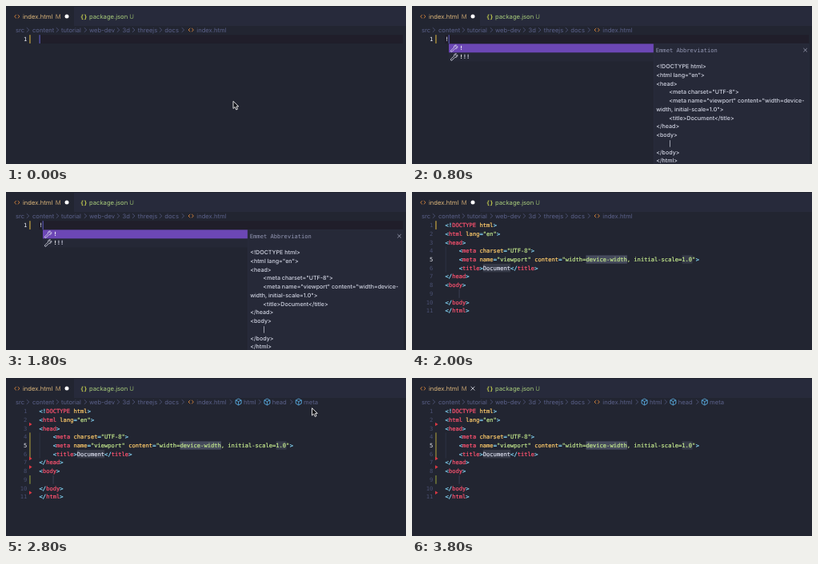
Write an HTML page that moves like this. It is 500x198 px and loops after 4000 ms.

```html
<!DOCTYPE html>
<html lang="en">
<head>
<meta charset="UTF-8">
<title>Emmet expansion</title>
<style>
  html, body { margin: 0; width: 100%; height: 100%; overflow: hidden; background: #222531; }
  svg { display: block; width: 500px; height: 198px; }
  text { white-space: pre; text-rendering: geometricPrecision; }
  .ui { font: 7.65px Inter, sans-serif; }
  .doc { font: 500 7.1px Inter, sans-serif; }
  .code { font: 7.125px "DejaVu Sans Mono", monospace; stroke-width: 0.2px; }
  .bold { font-weight: 700; }
</style>
</head>
<body>
<svg id="stage" viewBox="0 0 500 198"></svg>
<script>
const LOOP = 4000, STEP = 200;
const CHAR = 4.29, LEFT = 41.6, PITCH = 10.73;
const INK = {
  dim: '#5b618a', num: '#4a5072', white: '#f2f3fa', tag: '#ff5370', punct: '#89ddff',
  attr: '#ffcb6b', str: '#c3e88d', plain: '#d5d8e8', orange: '#d9853b'
};
const stage = document.getElementById('stage');

function add(parent, name, attrs, content) {
  const el = document.createElementNS('http://www.w3.org/2000/svg', name);
  for (const key in attrs) el.setAttribute(key, attrs[key]);
  if (content !== undefined) el.textContent = content;
  parent.appendChild(el);
  return el;
}
const group = () => add(stage, 'g', {});
const rect = (p, x, y, width, height, fill) => add(p, 'rect', { x, y, width, height, fill });
const text = (p, x, y, str, fill, cls = 'ui') => add(p, 'text', { x, y, fill, class: cls }, str);
const line = (p, d, stroke, w = 0.8) =>
  add(p, 'path', { d, stroke, 'stroke-width': w, fill: 'none', 'stroke-linejoin': 'round' });

const rowTop = n => 36.2 + (n - 1) * PITCH;
const rowBase = n => rowTop(n) + 7.9;
const chevron = (p, x) => line(p, `M${x - 1.5} 27.2l3 2.8l-3 2.8`, INK.dim, 0.7);
const angles = (p, x, y) =>
  line(p, `M${x - 0.9} ${y - 2.2}l-2.3 2.2l2.3 2.2M${x + 0.9} ${y - 2.2}l2.3 2.2l-2.3 2.2`, INK.orange, 0.9);
const cube = (p, x) =>
  line(p, `M${x} 26l3.5 1.8v4.2l-3.5 2l-3.5-2v-4.2zM${x - 3.5} 27.8l3.5 1.7l3.5-1.7M${x} 29.5v4.3`, '#5aabdf', 0.9);
const cross = (p, x, y, r, ink) =>
  line(p, `M${x - r} ${y - r}L${x + r} ${y + r}M${x + r} ${y - r}L${x - r} ${y + r}`, ink, 0.8);

// Code glyphs get a hairline outline in their own colour
function code(p, x, y, str, fill) {
  return text(p, x, y, str, fill, 'code').setAttribute('stroke', fill);
}
function lineNumber(p, n, active) {
  const el = text(p, 26.3, rowBase(n), n, active ? INK.white : INK.num, 'code');
  el.setAttribute('text-anchor', 'end');
}

// Tabs and breadcrumbs
const frame = group();
rect(frame, 0, 0, 500, 25, '#272a3b');
rect(frame, 0, 1, 85, 24, '#222531');
rect(frame, 0, 0, 500, 1, '#20222e');
angles(frame, 13.8, 13.2);
text(frame, 21, 16, 'index.html', '#dcb67a');
text(frame, 61.8, 16, 'M', '#b8986a');
text(frame, 93, 15.7, '{}', '#c6cf4e', 'code bold');
text(frame, 104, 16, 'package.json', '#a9cd7c');
text(frame, 154.3, 16, 'U', '#86a365');
[[12, 'src', 27.3], [33, 'content', 64.3], [69, 'tutorial', 99.3], [104, 'web-dev', 140.3],
 [145.5, '3d', 159.5], [164.7, 'threejs', 193.3], [198.3, 'docs', 221.2]].forEach(([x, s, arrow]) => {
  text(frame, x, 32.7, s, INK.dim);
  chevron(frame, arrow);
});
angles(frame, 231.2, 30);
text(frame, 238.3, 32.7, 'index.html', INK.dim);

const unsaved = add(stage, 'circle', { cx: 76, cy: 13.1, r: 2.5, fill: '#fff' });
const saved = cross(stage, 76, 13.1, 2.4, '#e6e7ef');

const symbols = group();
[[281.2, 290.6, 'html'], [317.2, 326.4, 'head'], [356.8, 365.8, 'meta']].forEach(([arrow, x, s]) => {
  chevron(symbols, arrow);
  cube(symbols, x);
  text(symbols, x + 6.3, 32.7, s, INK.dim);
});

// First line before expansion
const single = group();
rect(single, 41, rowTop(1), 455, PITCH, '#201e2a');
lineNumber(single, 1, true);

const startCaret = group();
rect(startCaret, 41.6, rowTop(1), 1, PITCH, '#6868d6');

// Suggestion list and its details
const popup = group();
code(popup, LEFT, rowBase(1), '!', INK.plain);
rect(popup, 46, 47.2, 450.5, 151, '#222531');
rect(popup, 46, 47.2, 256.5, 22.3, '#252836');
rect(popup, 46, 47.4, 256, 10.9, '#6c47b5');
rect(popup, 302, 47.2, 194.5, 151, '#262938');
line(popup, 'M302.3 47.2V198M302 47.4H496.3V198', '#2d3041', 0.6);
[52.8, 63.6].forEach(y =>
  line(popup, `M48.5 ${y + 3.2}l4-4a2.5 2.5 0 0 1 3-3l-1.4 1.6l1.2 1.3l1.5-1.4a2.5 2.5 0 0 1-3 3l-4 4q-1.7 0-1.3-1.5z`, '#e3e4ef', 0.8));
text(popup, 59.5, 55.4, '!', '#fff', 'code bold');
text(popup, 59.5, 66.2, '!', '#fff', 'code bold');
code(popup, 59.5 + CHAR, 66.2, '!!', INK.plain);
text(popup, 304.8, 57.8, 'Emmet Abbreviation', '#9498b4', 'code');
cross(popup, 491.6, 55.2, 2.2, '#a4a8bd');
const details = [
  '<!DOCTYPE html>', '<html lang="en">', '<head>', '\t<meta charset="UTF-8">',
  '\t<meta name="viewport" content="width=device-', 'width, initial-scale=1.0">',
  '\t<title>Document</title>', '</head>', '<body>', '\t|', '</body>', '</html>'
];
details.forEach((s, i) =>
  text(popup, s[0] === '\t' ? 321.3 : 305.2, 78.2 + i * PITCH, s.trim(), '#d3d6e4', 'doc'));

const popupCaret = group();
rect(popupCaret, 45.7, rowTop(1), 0.9, PITCH, '#6868d6');

// Expanded document
const expanded = group();
const mark = (row, col, len, fill) =>
  rect(expanded, LEFT + col * CHAR, rowTop(row) + 0.2, len * CHAR, PITCH - 0.4, fill);
mark(5, 41, 12, '#454a5c');
mark(5, 69, 3, '#363a48');
mark(6, 11, 8, '#363a48');
rect(expanded, 41.8, rowTop(4), 0.6, PITCH * 3, '#363b50');
rect(expanded, 58.7, rowTop(9), 0.7, PITCH, '#454b62');

const source = [
  '<!DOCTYPE html>', '<html lang="en">', '<head>', '    <meta charset="UTF-8">',
  '    <meta name="viewport" content="width=device-width, initial-scale=1.0">',
  '    <title>Document</title>', '</head>', '<body>', '', '</body>', '</html>'
];
function inkFor(token, before) {
  if (/^[<>=!\/]+$/.test(token)) return INK.punct;
  if (token[0] === '"') return INK.str;
  if (/<\/?!?$/.test(before)) return INK.tag;
  return before.lastIndexOf('<') > before.lastIndexOf('>') ? INK.attr : INK.plain;
}
source.forEach((s, i) => {
  lineNumber(expanded, i + 1, i === 4);
  for (const m of s.matchAll(/"[^"]*"|<\/?!?|[>=]|[\w-]+/g)) {
    code(expanded, LEFT + m.index * CHAR, rowBase(i + 1), m[0], inkFor(m[0], s.slice(0, m.index)));
  }
});

// Change marks in the gutter: bars beside edits, arrows below removed lines
const oldBar = group();
rect(oldBar, 29.2, rowTop(1), 1.5, PITCH, '#a58a3c');
const changes = group();
rect(changes, 29.2, rowTop(4), 1.5, PITCH * 3, '#857a3a');
rect(changes, 29.2, rowTop(9), 1.5, PITCH, '#737a38');
[2, 6, 7, 10].forEach(n =>
  add(changes, 'path', { d: `M29 ${rowTop(n + 1) - 2}l3.6 2.3l-3.6 2.3z`, fill: '#d93843' }));

const pointer = add(stage, 'path', {
  d: 'M0 0V9.2L2.2 7.2L3.8 10.7L5.5 9.9L4 6.6H6.8Z',
  fill: '#111217', stroke: '#f4f4f4', 'stroke-width': 0.9, 'stroke-linejoin': 'round'
});

// Visible spans in ms
const spans = [
  [single, 0, 2000], [startCaret, 0, 600], [popup, 800, 2000],
  [popupCaret, 800, 1400, 1800, 2000], [expanded, 2000, LOOP],
  [oldBar, 0, 2200], [changes, 2200, LOOP], [symbols, 2400, LOOP],
  [unsaved, 0, 3000], [saved, 3000, LOOP]
];
// Pointer steps: time, x, y (no position hides it)
const moves = [[0, 284, 119.3], [200, 274.3, 90.7], [400, 274.3, 100], [800],
               [2600, 318.6, 187], [2800, 382.5, 37.7], [3000]];

function draw(now) {
  const t = Math.floor((now % LOOP) / STEP) * STEP;
  for (const [el, ...edges] of spans) {
    const on = edges.filter(e => t >= e).length % 2;
    el.style.display = on ? '' : 'none';
  }
  const [, x, y] = moves.filter(m => t >= m[0]).pop();
  pointer.style.display = x === undefined ? 'none' : '';
  if (x !== undefined) pointer.setAttribute('transform', `translate(${x} ${y})`);
}

const start = performance.now();
function tick() {
  draw(performance.now() - start);
  requestAnimationFrame(tick);
}
tick();
</script>
</body>
</html>
```
